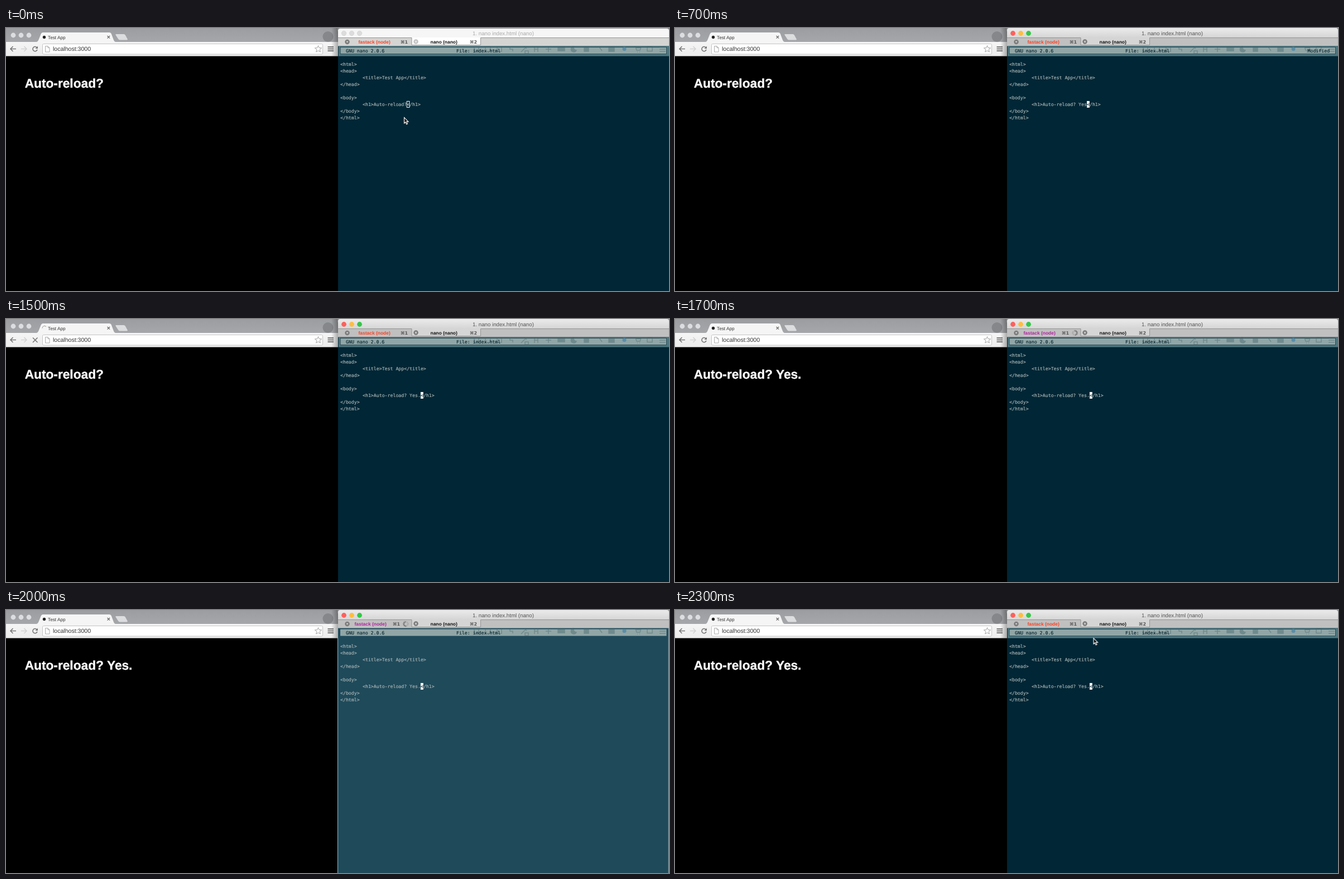
An HTML page for the animation above (2.4 s loop, 1188x472 px).

```html
<!DOCTYPE html>
<html lang="en">
<head>
<meta charset="utf-8">
<title>Auto-reload</title>
<style>
  html, body { margin: 0; width: 100%; height: 100%; overflow: hidden; background: #000; }
  svg { display: block; width: 100vw; height: 100vh; }
  text { font-family: "Liberation Sans", Arial, sans-serif; text-rendering: geometricPrecision; white-space: pre; }
  .mono text { font: 8.22px "DejaVu Sans Mono", monospace; fill: #a6b2b3; stroke: #a6b2b3; stroke-width: .2; }
  .mono .dark { fill: #0d2b35; stroke: #0d2b35; }
  .tab { font-size: 8.45px; font-weight: bold; }
  .key { font: bold 8px "DejaVu Sans", sans-serif; fill: #555; }
  .line { fill: none; stroke: #777; stroke-width: 1.6; }

  .anim { animation: 2.4s step-end infinite; }
  .blurred { animation-name: blurred; }
  .focused { animation-name: focused; }
  .hollow { animation-name: blurred; }
  .solid { animation-name: solid; }
  .modified { animation-name: modified; }
  .typed { animation-name: typed; }
  .tail { animation-name: tail; }
  .loading { animation-name: loading; }
  .loaded { animation-name: loaded; }
  .answer { animation-name: answer; }
  .idle { animation-name: idle; }
  .busy { animation-name: busy; }
  .wheel { animation-name: wheel; }
  .bell { animation-name: bell; }
  .calm { animation-name: calm; }
  .flash { animation-name: flash; }
  .mouse { animation-name: mouse; }
  .turn { animation-name: turn; transform-origin: 69px 16.5px; }
  .spokes { animation-name: spokes; transform-origin: 716.5px 25px; }

  @keyframes blurred { 0% { visibility: visible } 12.5%, 100% { visibility: hidden } }
  @keyframes focused { 0% { visibility: hidden } 12.5%, 100% { visibility: visible } }
  @keyframes solid {
    0% { visibility: hidden } 12.5% { visibility: visible }
    45.83% { visibility: hidden } 54.16%, 100% { visibility: visible }
  }
  @keyframes modified { 0% { visibility: hidden } 16.66% { visibility: visible } 54.16%, 100% { visibility: hidden } }
  @keyframes typed {
    0% { clip-path: inset(0 100% 0 0) } 20.83% { clip-path: inset(0 75% 0 0) }
    25% { clip-path: inset(0 50% 0 0) } 29.16% { clip-path: inset(0 25% 0 0) }
    37.5%, 100% { clip-path: inset(0) }
  }
  @keyframes tail {
    0% { transform: none } 16.66% { transform: translateX(4.95px) }
    20.83% { transform: translateX(9.9px) } 25% { transform: translateX(14.85px) }
    29.16% { transform: translateX(19.8px) } 37.5%, 100% { transform: translateX(24.75px) }
  }
  @keyframes loading { 0% { visibility: hidden } 58.33% { visibility: visible } 66.66%, 100% { visibility: hidden } }
  @keyframes loaded { 0% { visibility: visible } 58.33% { visibility: hidden } 66.66%, 100% { visibility: visible } }
  @keyframes answer { 0% { visibility: hidden } 66.66%, 100% { visibility: visible } }
  @keyframes idle { 0% { visibility: visible } 70.83% { visibility: hidden } 91.66%, 100% { visibility: visible } }
  @keyframes busy { 0% { visibility: hidden } 70.83% { visibility: visible } 91.66%, 100% { visibility: hidden } }
  @keyframes wheel { 0% { visibility: hidden } 70.83% { visibility: visible } 87.5%, 100% { visibility: hidden } }
  @keyframes bell { 0% { fill: #012635 } 83.33% { fill: #1f4a5a } 87.5%, 100% { fill: #012635 } }
  @keyframes calm { 0% { visibility: visible } 83.33% { visibility: hidden } 87.5%, 100% { visibility: visible } }
  @keyframes flash { 0% { visibility: hidden } 83.33% { visibility: visible } 87.5%, 100% { visibility: hidden } }
  @keyframes turn { 0% { transform: rotate(-60deg) } 62.5%, 100% { transform: none } }
  @keyframes spokes {
    0% { transform: rotate(-180deg) } 75% { transform: rotate(-120deg) }
    79.16% { transform: rotate(-60deg) } 83.33%, 100% { transform: none }
  }
  @keyframes mouse {
    0% { transform: translate(713px, 160px); visibility: visible }
    4.16% { transform: translate(712px, 167px); visibility: visible }
    8.33% { transform: translate(711px, 173px); visibility: visible }
    16.66% { transform: translate(711px, 173px); visibility: hidden }
    91.66% { transform: translate(751px, 124px); visibility: visible }
    95.83%, 100% { transform: translate(749.5px, 50px); visibility: visible }
  }
</style>
</head>
<body>
<svg viewBox="0 0 1188 472" preserveAspectRatio="none">
  <defs>
    <linearGradient id="frame" x2="0" y2="1">
      <stop stop-color="#9b9da0"/><stop offset="1" stop-color="#a5a7aa"/>
    </linearGradient>
    <linearGradient id="bar" x2="0" y2="1">
      <stop stop-color="#ebebeb"/><stop offset="1" stop-color="#d4d4d4"/>
    </linearGradient>
    <linearGradient id="tools" x2="0" y2="1">
      <stop stop-color="#f5f5f5"/><stop offset="1" stop-color="#ededed"/>
    </linearGradient>
    <linearGradient id="shade">
      <stop stop-opacity="0"/><stop offset="1" stop-opacity=".3"/>
    </linearGradient>
    <g id="close">
      <circle r="4.2" fill="#777"/>
      <path d="M-1.6-1.6 1.6 1.6M1.6-1.6-1.6 1.6" stroke="#ddd" stroke-width="1.1"/>
    </g>
  </defs>

  <!-- browser -->
  <rect width="1188" height="472"/>
  <rect width="595" height="26" fill="url(#frame)"/>
  <g fill="#dcdde0">
    <circle cx="13" cy="13" r="4.4"/><circle cx="27" cy="13" r="4.4"/><circle cx="41" cy="13" r="4.4"/>
  </g>
  <path d="M196.500 12.500q-1-1.500 1-1.500h13.500q2 0 3 2l3.500 6.500q1 2-1.500 2h-12q-2 0-3-2z" fill="#dcddde"/>
  <path d="M53 25.500q4-.5 5.500-4.500l4-10q1.200-3 4-3h118.500q3 0 4 3l3.500 9.500q1.500 4.500 5 5z" fill="#f5f5f5"/>
  <rect y="25" width="595" height="25.500" fill="url(#tools)"/>
  <text x="75" y="19.500" font-size="8.25" fill="#333">Test App</text>
  <path d="M181.500 14l4.600 4.600m0-4.600l-4.600 4.600" class="line" style="stroke:#666;stroke-width:1.200"/>
  <circle class="anim loaded" cx="68.500" cy="16.500" r="2.700" fill="#222"/>
  <g class="anim loading">
    <path class="anim turn line" d="M65 16.500a4 4 0 0 1 7-2.700" style="stroke:#999;stroke-width:1"/>
  </g>
  <circle cx="577" cy="15.500" r="9.500" fill="#85878a"/>

  <path class="line" d="M18 37.500H8m4.500-4.500L8 37.500l4.500 4.500"/>
  <path class="line" d="M27 37.500h10m-4.500-4.500l4.500 4.500-4.500 4.500" style="stroke:#d3d3d3"/>
  <g class="anim loaded">
    <path class="line" d="M55.600 35.500a4.100 4.100 0 1 0 .4 3.300"/>
    <path d="M57 32.500v4.500h-4.500z" fill="#777"/>
  </g>
  <path class="anim loading line" d="M48 33.500l8.500 8.500m0-8.500l-8.500 8.500"/>
  <rect x="65.500" y="28.500" width="502" height="18.500" rx="2" fill="#fff" stroke="#c4c4c4"/>
  <path class="line" d="M70.500 32.500h4.500l3 3v7.500h-7.500zM75 32.500v3h3" style="stroke:#a2a2a2;stroke-width:.9"/>
  <text x="84" y="41.300" font-size="10.550" fill="#333">localhost:3000</text>
  <path class="line" d="M559.500 31.500l1.700 4.100 4.400.3-3.400 2.800 1.100 4.300-3.800-2.300-3.800 2.300 1.100-4.300-3.400-2.800 4.400-.3z" style="stroke:#999;stroke-width:.9"/>
  <path class="line" d="M576.500 34h10.500m-10.500 3.500h10.500m-10.500 3.500h10.500" style="stroke-width:2"/>
  <rect x="583" width="12" height="50.500" fill="url(#shade)"/>
  <g font-size="22.700" font-weight="bold" fill="#fff" stroke="#fff" stroke-width=".35">
    <text x="33.700" y="106.500">Auto-reload?</text>
    <text class="anim answer" x="181" y="106.500">Yes.</text>
  </g>

  <!-- terminal window -->
  <rect class="anim bell" x="595" y="32" width="593" height="440"/>
  <path class="anim flash" d="M594.500 32v440M1187.300 32v440" stroke="#a9b4b8"/>
  <rect x="594" width="594" height="6" fill="#88898b"/>
  <g class="anim blurred">
    <path d="M595 18V5q0-4 4-4h585q4 0 4 4v13z" fill="#f6f6f6"/>
    <rect x="595" y="17" width="593" height="15.500" fill="#d4d4d3"/>
    <path d="M727 17h123.500v13.500h-123.500z" fill="#fff"/>
    <g fill="#dcdcdc" stroke="#cdcdcd" stroke-width=".6">
      <circle cx="605.500" cy="9.500" r="4.200"/><circle cx="619.500" cy="9.500" r="4.200"/><circle cx="633.500" cy="9.500" r="4.200"/>
    </g>
    <text x="836" y="13" font-size="9.700" fill="#aaa">1. nano index.html (nano)</text>
    <use href="#close" x="734.500" y="24.500" opacity=".45"/>
  </g>
  <g class="anim focused">
    <path d="M595 18V4q0-4 4-4h585q4 0 4 4v14z" fill="url(#bar)"/>
    <rect x="595" y="17" width="593" height="15.500" fill="#c0c0c0"/>
    <path d="M727 17h123.500v13.500h-123.500z" fill="#d5d5d5"/>
    <circle cx="605.500" cy="9.500" r="4.400" fill="#fc615c"/>
    <circle cx="619.500" cy="9.500" r="4.400" fill="#fdbd40"/>
    <circle cx="633.500" cy="9.500" r="4.400" fill="#34c748"/>
    <text x="836" y="13" font-size="9.700" fill="#555">1. nano index.html (nano)</text>
    <use href="#close" x="734.500" y="24.500"/>
  </g>
  <path d="M595 17.500h132v13h123.500v-13h337.500" fill="none" stroke="#8e8e8e" stroke-width=".9"/>
  <use href="#close" x="611.500" y="25"/>
  <g class="anim idle">
    <text class="tab" x="631.500" y="28" fill="#fb4224">fastack (node)</text>
    <text class="key" x="707" y="28">⌘1</text>
  </g>
  <g class="anim busy">
    <text class="tab" x="624.500" y="28" fill="#b0249f">fastack (node)</text>
    <text class="key" x="693" y="28">⌘1</text>
  </g>
  <g class="anim wheel">
    <g class="anim spokes" fill="none" stroke-width="2.700" stroke-dasharray=".8 1.200">
      <circle cx="716.500" cy="25" r="3.820" stroke="#999"/>
      <path d="M716.500 28.820a3.820 3.820 0 0 1 0-7.640" stroke="#444"/>
    </g>
  </g>
  <text class="tab" x="760.500" y="27.500" fill="#111">nano (nano)</text>
  <text class="key" x="831" y="27.500">⌘2</text>

  <!-- editor -->
  <rect class="anim calm" x="596" y="32.500" width="592" height="18" fill="#4d7780"/>
  <rect x="599" y="34.500" width="584.500" height="12" fill="#91a6a6"/>
  <rect class="anim calm" x="599" y="34.500" width="584.500" height="12" fill="none" stroke="#24464f" stroke-width=".9"/>
  <g fill="none" stroke="#41636a" stroke-width="1.500" opacity=".4">
    <path d="M839 34h8v8h-8zM859 34h9v8h-9zM880 33v9h8v-9M903 34v4h5v4"/>
    <path d="M923 43l8-8m-2-2l4 4m-3 4h6v5h-6zM947 33v10m6-10v10m-6-5h6"/>
    <path d="M967 38h10m-5-5v10M1063 34l5 7M1149 33.500h9v8h-9z"/>
    <path d="M1126 34h2l2 6h6l1.500-4.500h-8.500M1131 43h1m3 0h1M1171 34h11m-11 4h11m-11 4h11"/>
    <path d="M989 34h12v7h-12zM1036 34h8v8h-8zM1080 34h10v8h-10z" fill="#41636a"/>
    <path d="M1017 33a5 5 0 1 0 5 7q-5 0-5-7z" fill="#41636a"/>
  </g>
  <circle cx="1108" cy="37.500" r="3.500" fill="#4c87a8" opacity=".8"/>
  <g class="mono">
    <text class="dark" x="609" y="43.500">GNU nano 2.0.6</text>
    <text class="dark" x="807" y="43.500">File: index.html</text>
    <text class="anim modified dark" x="1133.500" y="43.500">Modified</text>
    <text x="599" y="67.500">&lt;html&gt;</text>
    <text x="599" y="79.500">&lt;head&gt;</text>
    <text x="639" y="91.500">&lt;title&gt;Test App&lt;/title&gt;</text>
    <text x="599" y="103.500">&lt;/head&gt;</text>
    <text x="599" y="127.500">&lt;body&gt;</text>
    <text x="639" y="139.500">&lt;h1&gt;Auto-reload?</text>
    <text class="anim typed" x="723.100" y="139.500">Yes.</text>
    <g class="anim tail">
      <text x="718.200" y="139.500">&lt;/h1&gt;</text>
      <rect class="anim hollow" x="718.300" y="131.500" width="4.500" height="11" fill="none" stroke="#fff"/>
      <g class="anim solid">
        <rect x="718" y="131" width="5" height="12" fill="#fff"/>
        <text class="dark" x="718.200" y="139.500">&lt;</text>
      </g>
    </g>
    <text x="599" y="151.500">&lt;/body&gt;</text>
    <text x="599" y="163.500">&lt;/html&gt;</text>
  </g>

  <path class="anim mouse" d="M.500.500v10.500l2.400-2.200 1.700 4 1.900-.8-1.700-3.900h3.200z" fill="#111" stroke="#fff" stroke-width="1.100"/>
</svg>
</body>
</html>
```
